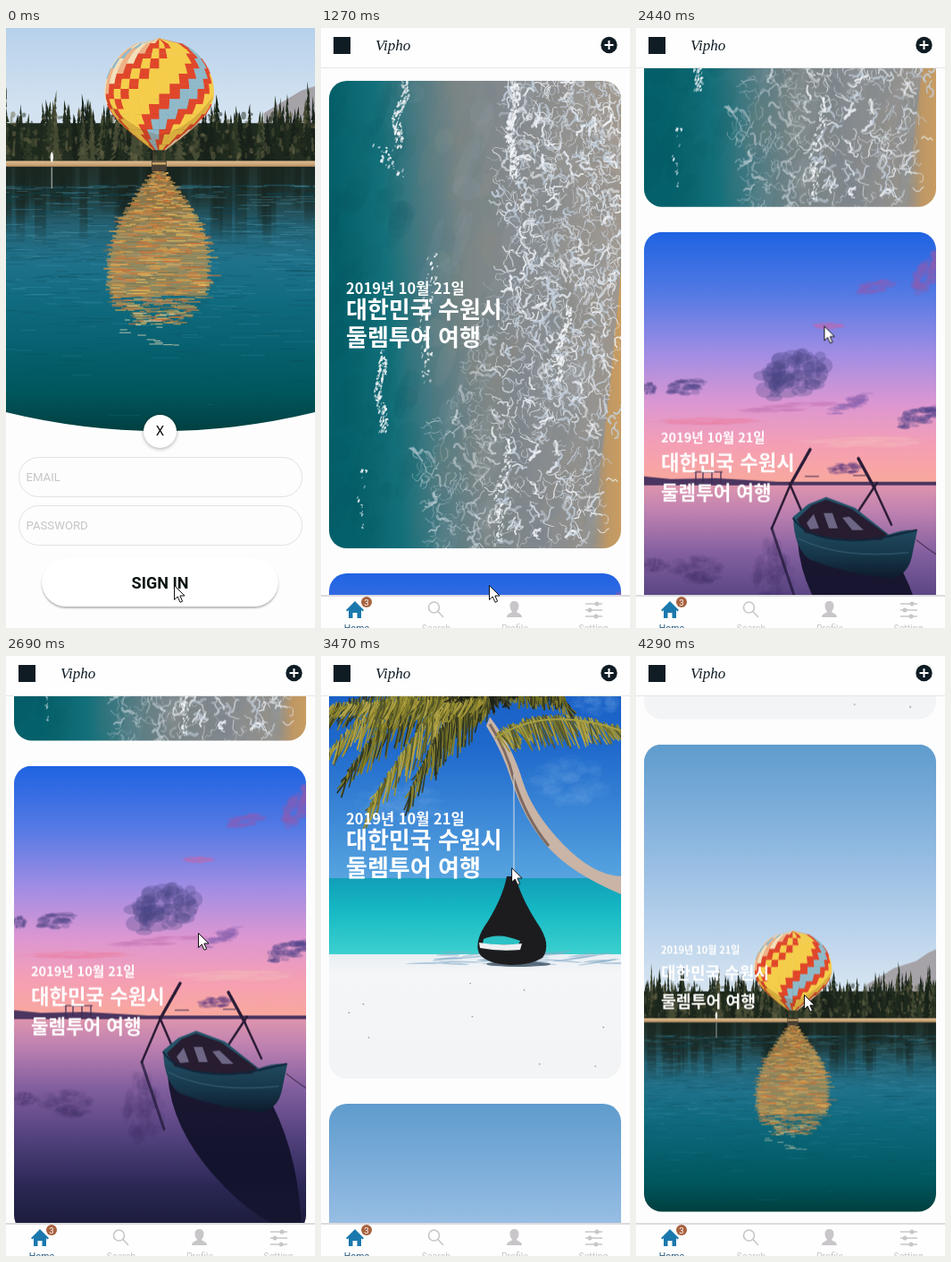
An HTML page with a canvas that plays this animation: 346 by 670 pixels, repeating every 4360 ms.

```html
<!DOCTYPE html>
<html lang="ko">
<head>
<meta charset="utf-8">
<title>Photo diary</title>
<style>
html, body { margin: 0; width: 100%; height: 100%; overflow: hidden; background: #fdfdfd; }
body { position: relative; font-family: Roboto, sans-serif; }
div, canvas, svg, span { position: absolute; box-sizing: border-box; }
.page { left: 0; top: 0; width: 346px; height: 670px; overflow: hidden; background: #fdfdfd; }

#lake { left: 0; top: 0; clip-path: path("M0 0H346V429Q173 471 0 429Z"); }
.close { left: 154px; top: 432px; width: 37px; height: 37px; border-radius: 50%; background: #fff;
  box-shadow: 0 1px 4px #0005; font: 15px/37px Roboto, sans-serif; text-align: center; color: #111; }
.field { left: 13.5px; width: 318px; height: 45px; border: 1px solid #e2e2e2; border-radius: 23px;
  padding-left: 8px; font-size: 13.2px; line-height: 44px; color: #c6c6c6; }
.sign { left: 40px; top: 592px; width: 265px; height: 54px; border-radius: 27px; background: #fff;
  box-shadow: 0 2px 2px #0004; font: bold 18px/55px Roboto, sans-serif; text-align: center; color: #0b1510; }

#home { opacity: 0; animation: enter 4.36s linear infinite; }
.track { left: 9px; top: 0; width: 327px; animation: scroll 4.36s linear infinite; }
.card { left: 0; width: 327px; height: 522px; border-radius: 20px; overflow: hidden; color: #fff; }
.card canvas { animation: develop 4.36s linear infinite; }
.card span { left: 19px; white-space: nowrap; line-height: 1; transform: translateY(-50%);
  font-family: "Noto Sans CJK KR", "Noto Sans CJK JP", sans-serif; font-weight: 700; }
.bar { left: 0; width: 346px; background: #fefefe; }
.head { top: 0; height: 45px; border-bottom: 1px solid #e6e6e6; }
.mark { left: 14px; top: 10px; width: 19px; height: 19px; background: #0f1c24; }
.title { left: 61px; top: 9px; font: italic 17px/22px "Liberation Serif", serif; color: #0f1c24; }
.nav { top: 633px; height: 37px; border-top: 2px solid #dcdcdf; overflow: hidden; }
.nav svg { left: 0; top: -2px; }

#pointer { left: 0; top: 0; width: 0; height: 0; animation: point 4.36s linear infinite; }
.press { left: -12px; top: -12px; width: 24px; height: 24px; border-radius: 50%; background: #cdb468e0;
  opacity: 0; animation: press 4.36s step-end infinite; }
#pointer svg { left: 0; top: 0; overflow: visible; }

@keyframes enter {
  0%, 21.779% { opacity: 0; transform: translateY(26px); }
  21.78%, 22.9% { opacity: .6; transform: translateY(26px); }
  24.541% { opacity: .84; transform: translateY(10px); }
  26.147% { opacity: .94; transform: translateY(4px); }
  29.128%, 100% { opacity: 1; transform: none; }
}
@keyframes develop {
  0%, 22.9% { opacity: .7; }
  27.5%, 100% { opacity: 1; }
}
@keyframes scroll {
  0%, 45.872% { transform: translateY(0); }
  48.6%, 49.7% { transform: translateY(-41px); }
  50.8% { transform: translateY(-125px); }
  52.982% { transform: translateY(-270px); }
  55.734% { transform: translateY(-375px); }
  58.716% { transform: translateY(-450px); }
  61.67%, 62.5% { transform: translateY(-486.5px); }
  65.596% { transform: translateY(-498px); }
  69.266% { transform: translateY(-505px); }
  71.101% { transform: translateY(-560px); }
  72.477% { transform: translateY(-640px); }
  74.06%, 75.5% { transform: translateY(-774px); }
  76.4% { transform: translateY(-980px); }
  78.67% { transform: translateY(-1155px); }
  81.422% { transform: translateY(-1310px); }
  83.716% { transform: translateY(-1400px); }
  85.3%, 86.9% { transform: translateY(-1441.5px); }
  89.908% { transform: translateY(-1482px); }
  91.743% { transform: translateY(-1500px); }
  93.578% { transform: translateY(-1550px); }
  95.413% { transform: translateY(-1590px); }
  98.37%, 100% { transform: translateY(-1609.5px); }
}
@keyframes point {
  0%, 39.679% { transform: translate(188px, 622px); }
  45.872% { transform: translate(192px, 570px); }
  48.6%, 49.7% { transform: translate(193px, 529px); }
  52.982% { transform: translate(208px, 345px); }
  61.67%, 62.5% { transform: translate(215px, 309px); }
  69.266% { transform: translate(222px, 395px); }
  74.06%, 77.064% { transform: translate(225px, 145px); }
  80.275% { transform: translate(210px, 260px); }
  85.3%, 86.9% { transform: translate(189px, 473px); }
  90.826% { transform: translate(188px, 482px); }
  95.413%, 100% { transform: translate(188px, 378px); }
}
@keyframes press {
  0%, 5.734%, 51.606%, 73.165%, 94.954%, 100% { opacity: 0; }
  2.982%, 45.872%, 69.266%, 90.826% { opacity: 1; }
}
</style>
</head>
<body>
<div class="page">
  <canvas id="lake" width="346" height="452"></canvas>
  <div class="close">X</div>
  <div class="field" style="top:478.5px">EMAIL</div>
  <div class="field" style="top:532.5px">PASSWORD</div>
  <div class="sign">SIGN IN</div>
</div>

<div class="page" id="home">
  <div class="track"></div>
  <div class="bar head">
    <div class="mark"></div>
    <div class="title">Vipho</div>
    <svg width="346" height="44"><circle cx="322.5" cy="19" r="9.2" fill="#0f1c24"/>
      <path d="M317.5 19h10M322.5 14v10" stroke="#fff" stroke-width="2"/></svg>
  </div>
  <div class="bar nav">
    <svg width="346" height="37" font-family="Roboto, sans-serif" font-size="10.5" text-anchor="middle">
      <path d="M28 17 38 7 48 17 46.500 18.500 45 17V26H40.500V20H35.500V26H31V17L29.500 18.500Z" fill="#1b78ad"/>
      <circle cx="51" cy="8" r="6" fill="#a8623f"/>
      <text x="51" y="11.500" font-size="9.500" fill="#fff">3</text>
      <g fill="none" stroke="#c9c6c9" stroke-width="1.600">
        <circle cx="126.500" cy="14" r="6"/><path d="M131 18.500 137 25"/>
        <path d="M296 10h19M296 17h19M296 24h19"/>
      </g>
      <g fill="#c9c6c9">
        <path d="M216.500 7c3 0 5 2 5 5 0 3-1 5-2.500 6.500 0 2 6 2 6 6.500H208c0-4.500 6-4.500 6-6.500-1.500-1.500-2.500-3.500-2.500-6.500 0-3 2-5 5-5Z"/>
        <circle cx="309" cy="10" r="2.500"/><circle cx="301" cy="17" r="2.500"/><circle cx="308" cy="24" r="2.500"/>
        <text x="129" y="41">Search</text><text x="217" y="41">Profile</text><text x="305" y="41">Setting</text>
      </g>
      <text x="40" y="41" fill="#2a5a80">Home</text>
    </svg>
  </div>
</div>

<div id="pointer">
  <div class="press"></div>
  <svg width="14" height="21"><path d="M.5.5V16.500L4.200 13 7 19.300 9.600 18.200 6.900 12H12Z" fill="#fff" stroke="#111"/></svg>
</div>

<script>
const W = 327, H = 522, TAU = Math.PI * 2;
const random = seed => () => (seed = seed * 16807 % 2147483647) / 2147483647;
const pick = (list, r) => list[Math.floor(r() * list.length)];

function fade(c, x0, y0, x1, y1, stops) {
  const g = c.createLinearGradient(x0, y0, x1, y1);
  stops.forEach(([at, color]) => g.addColorStop(at, color));
  return g;
}
function fall(c, top, bottom, stops) {
  c.fillStyle = fade(c, 0, top, 0, bottom, stops);
  c.fillRect(0, top, W, bottom - top);
}
function shape(c, color, path) {
  c.fillStyle = color;
  c.fill(new Path2D(path));
}
function line(c, color, width, path) {
  c.strokeStyle = color;
  c.lineWidth = width;
  c.stroke(new Path2D(path));
}
function oval(c, color, x, y, rx, ry, turn = 0) {
  c.fillStyle = color;
  c.beginPath();
  c.ellipse(x, y, rx, ry, turn, 0, TAU);
  c.fill();
}
function cloud(c, r, color, x, y, rx, ry, alpha = .3, tilt = 0) {
  c.globalAlpha = alpha;
  for (let i = 0; i < 60; i++) {
    const a = r() * TAU, d = Math.sqrt(r()) * .8, dx = Math.cos(a) * d * rx;
    oval(c, color, x + dx, y + Math.sin(a) * d * ry - dx * tilt, rx * (.08 + r() * .2), ry * (.1 + r() * .2));
  }
  c.globalAlpha = 1;
}

// Aerial view of surf on a beach
function surf(c) {
  const r = random(71);
  c.fillStyle = fade(c, 0, 20, W, 0, [[0, "#04606a"], [.16, "#13707a"], [.3, "#4d7a82"], [.44, "#7b8586"],
    [.62, "#848a8f"], [1, "#a39a90"]]);
  c.fillRect(0, 0, W, H);
  for (let i = 0; i < 260; i++) {
    c.globalAlpha = .07;
    const x = r() * W;
    oval(c, x < 90 ? "#004e5c" : pick(["#5d6f7a", "#9a8a74", "#a9b8c6"], r), x, r() * H, 4 + r() * 14, 8 + r() * 26, .3);
  }
  c.globalAlpha = 1;
  shape(c, fade(c, 295, 0, W, 0, [[0, "#b08f6800"], [.5, "#bd9765"], [1, "#c99d62"]]),
    "M327 210Q318 310 310 380T292 522H327Z");
  const sand = y => 332 - Math.max(0, y - 230) * .09 + 4 * Math.sin(y / 14);
  const edge = y => Math.max(105, 192 - Math.max(0, y - 220) * .45) + 9 * Math.sin(y / 24);
  c.lineCap = c.lineJoin = "round";
  // Foam threads wander along short random walks
  for (let i = 0; i < 1500; i++) {
    let y = r() * H, x = edge(y) + r() * (W - edge(y)), a = r() * TAU;
    if (x > sand(y)) continue;
    c.strokeStyle = pick(["#f0f3f7", "#dde4ec", "#c3d0de"], r);
    c.globalAlpha = (x > 185 ? 1 : .6) * (.4 + r() * .5);
    c.lineWidth = .6 + r() * r() * 3;
    c.beginPath();
    c.moveTo(x, y);
    for (let k = 0; k < 5; k++) {
      a += (r() - .5) * 2.6;
      c.lineTo(x += Math.cos(a) * 3, y += Math.sin(a) * 3.5);
    }
    c.stroke();
  }
  const crest = (x0, y0, x1, y1, n, wide) => {
    for (let i = 0; i < n; i++) {
      const t = r();
      c.globalAlpha = .4 + r() * .6;
      oval(c, "#f2f5f8", x0 + (x1 - x0) * t + (r() - .5) * wide + 3 * Math.sin(t * 9), y0 + (y1 - y0) * t,
        .4 + r() * 1.1, .6 + r() * 2, .4);
    }
  };
  crest(84, 0, 74, 78, 130, 9);
  crest(52, 70, 84, 110, 26, 12);
  crest(57, 300, 59, 392, 130, 9);
  crest(38, 430, 36, 500, 16, 8);
  crest(207, 0, 204, 108, 260, 9);
  crest(114, 190, 106, 340, 80, 12);
  crest(268, 250, 255, 336, 140, 6);
  crest(200, 400, 186, 520, 110, 9);
  c.globalAlpha = 1;
}

// Moored boat at dusk
function dusk(c) {
  const r = random(23);
  fall(c, 0, 282, [[0, "#1f63e2"], [.25, "#557ae4"], [.48, "#a08de4"], [.68, "#dc97d2"], [.85, "#f59fb4"], [1, "#f9a99c"]]);
  fall(c, 281, H, [[0, "#e096ae"], [.14, "#bc80b0"], [.32, "#8460a0"], [.55, "#54427f"], [.78, "#2b2855"], [1, "#181a36"]]);
  [["#4a4484", 166, 162, 46, 32, .3], ["#5a4c90", 47, 173, 26, 10, .1], ["#54478c", 306, 207, 27, 13, .3],
    ["#5a4c90", 6, 175, 10, 8, 0], ["#8b62ae", 230, 193, 28, 8, .5], ["#c06ab4", 207, 105, 20, 4, 0],
    ["#8460bc", 258, 62, 26, 8, .2], ["#8a5cb4", 320, 42, 22, 20, 1], ["#c97fb8", 160, 196, 60, 5, .1],
    ["#eb86aa", 70, 212, 70, 5, 0], ["#f3b3b8", 250, 235, 80, 7, 0], ["#634080", 226, 264, 22, 7, .1]
  ].forEach(([color, x, y, rx, ry, tilt]) => cloud(c, r, color, x, y, rx, ry, .3, tilt));
  [[60, 378, 34, 18], [145, 380, 26, 44], [12, 372, 18, 9]]
    .forEach(([x, y, rx, ry]) => cloud(c, r, "#34285f", x, y, rx, ry, .08));
  shape(c, "#4b3560", "M0 273 30 276 80 275 150 279 327 279V283H0Z");
  line(c, "#3a2a50", 1.2, "M55 268H88M58 268V280M66 262V280M76 268V280M86 268V280M180 273h16M234 272h14");
  shape(c, fade(c, 0, 360, 0, H, [[0, "#14122af0"], [.6, "#10112af0"], [1, "#10112690"]]),
    "M172 345Q176 405 226 460T322 522Q320 440 290 380Z");
  c.lineCap = "round";
  line(c, "#2b1c36", 3.500, "M186 243 164 282M240 253 258 286");
  line(c, "#2b1c36", 2.500, "M164 282 143 331M163 281 179 318M258 286 277 327M261 280 236 318");
  line(c, "#221a3ac0", 3, "M143 331 168 406");
  line(c, "#2b1c36", 1, "M305 344Q316 353 327 360");
  shape(c, fade(c, 0, 320, 0, 388, [[0, "#245369"], [.6, "#17374a"], [1, "#0d1a2c"]]),
    "M167 318Q168 354 186 366 230 383 278 387 296 382 300 362L306 333Q290 332 274 338L236 308 204 296 184 304Z");
  shape(c, "#271c30", "M171 321 188 305 204 299 232 309 272 338 266 344Q220 346 180 336Z");
  shape(c, "#6d6684", "M182 325 190 315 196 331 186 332ZM201 314 211 314 217 331 207 331ZM222 319 230 318 246 333 233 333Z");
  line(c, "#10263a", 2, "M167 320Q180 339 212 343T274 340L305 333");
  line(c, "#3b6478", 1, "M172 342Q220 366 296 358");
}

function frond(c, r, colors, x0, y0, mx, my, x1, y1, drop) {
  c.lineWidth = 1.6;
  for (let i = 0; i <= 130; i++) {
    const t = i / 130, s = 1 - t;
    const x = s * s * x0 + 2 * s * t * mx + t * t * x1;
    const y = s * s * y0 + 2 * s * t * my + t * t * y1;
    const len = drop * (.35 + .65 * Math.sin(Math.PI * Math.min(1, t * .85 + .1)));
    c.strokeStyle = pick(colors, r);
    c.beginPath();
    c.moveTo(x - 2, y - 7 * r());
    c.quadraticCurveTo(x, y, x + (x1 - x0) * .07 + (r() - .5) * 12, y + len * (.4 + r() * .8));
    c.stroke();
  }
}

// Leaning palm with a hanging chair
function palm(c) {
  const r = random(57);
  fall(c, 0, 300, [[0, "#1252bd"], [.5, "#1f69cc"], [1, "#58a5e0"]]);
  fall(c, 298, 386, [[0, "#129fb8"], [.4, "#16b9c4"], [1, "#3fd2d0"]]);
  fall(c, 383, H, [[0, "#e8eff4"], [.15, "#f5f6f8"], [1, "#f2f4f6"]]);
  [[232, 30, 40, 18], [45, 55, 50, 25], [270, 190, 50, 30], [80, 215, 60, 25], [300, 100, 30, 20]]
    .forEach(([x, y, rx, ry]) => cloud(c, r, "#80b8ec", x, y, rx, ry, .06));
  shape(c, "#c9b4a6", "M180 118Q205 150 217 190 228 225 262 260T327 296V316Q270 292 244 262 218 232 204 188 194 156 176 128Z");
  line(c, "#7f6a60", 3, "M180 126Q199 155 207 188 221 232 246 262");
  line(c, "#d9e2ec", 1, "M207 182V300");

  const dark = ["#22241a", "#33351f", "#1b2018", "#4a4a28"], olive = ["#6f6c24", "#8c842c", "#3c4022", "#2c3020"];
  const gold = ["#a09334", "#7c782a", "#55562a", "#b3a548"];
  for (let i = 0; i < 11; i++) frond(c, r, dark, 178, 95, 150 + i * 6, 10, 100 + i * 14, 18 + Math.abs(i - 5) * 8, 34);
  [[100, 70, -8, 116, 36], [90, 55, -4, 165, 38], [90, 65, 20, 190, 40], [120, 80, 46, 225, 42], [140, 90, 92, 205, 44], [100, 100, 4, 108, 24]]
    .forEach(([mx, my, x, y, drop], i) => frond(c, r, i % 2 ? gold : olive, 180, 100, mx, my, x, y, drop));
  [[225, 40, 268, 108, 30], [250, 62, 258, 90, 32], [215, 60, 232, 92, 30]]
    .forEach(([mx, my, x, y, drop]) => frond(c, r, olive, 185, 80, mx, my, x, y, drop));
  frond(c, r, gold, 190, 140, 240, 105, 330, 135, 28);
  line(c, "#a8a040", 2, "M186 142Q240 104 327 133");
  for (let i = 0; i < 40; i++) frond(c, r, dark, 178, 90, 178, 70, 125 + r() * 90, 20 + r() * 90, 6);

  for (let i = 0; i < 34; i++) {
    c.globalAlpha = .55;
    oval(c, "#84a9c6", 105 + r() * 225, 380 + r() * 14, 8 + r() * 20, 1, (r() - .5) * .4);
  }
  c.globalAlpha = 1;
  oval(c, "#586b7c", 212, 394, 36, 3);
  shape(c, "#1c1c1f", "M199 296H209Q214 318 233 348 250 372 239 387 226 395 204 395 176 394 168 382 162 368 178 346 195 318 199 296Z");
  shape(c, "#2cc2c6", "M173 366Q190 358 214 368L212 372H172Z");
  shape(c, "#eef0f2", "M168 370Q192 374 216 371L214 378Q190 380 169 376Z");
  for (let i = 0; i < 9; i++) oval(c, "#8f9296", r() * W, 415 + r() * 100, 1, .7);
}

// Hot-air balloon over a forest lake
const girth = y => y < 252 ? 43.5 * Math.sqrt(Math.max(0, 1 - ((252 - y) / 43.5) ** 2))
  : 5 + 38.5 * Math.cos((y - 252) / 45 * Math.PI / 2);

function envelope(c) {
  const Y = "#f5cd4a", R = "#e0472a", B = "#8fb9c8", C = "#f3dfb8", P = "#eeb184";
  // Diagonal bands, each given by where it ends
  const bands = [[6, C], [8, B], [13, C], [16, R], [18, Y], [20, R], [27, Y], [30, R], [34, B], [37, R], [43, Y], [46, R], [60, C]];
  const rows = 22, gores = 16, step = 88.5 / rows;
  for (let g = 0; g < gores; g++) {
    const a = Math.sin((g / gores - .5) * Math.PI), b = Math.sin(((g + 1) / gores - .5) * Math.PI);
    for (let k = 0; k < rows; k++) {
      const y = 208.5 + k * step, p = girth(y), q = girth(y + step);
      let color = bands.find(([end]) => k + 2 * g < end)[1];
      if (g < 6 && g % 2 && color === C) color = P;
      c.fillStyle = color;
      c.beginPath();
      c.moveTo(166.5 + a * p, y);
      c.lineTo(166.5 + b * p + .3, y);
      c.lineTo(166.5 + b * q + .3, y + step + .3);
      c.lineTo(166.5 + a * q, y + step + .3);
      c.fill();
    }
  }
  c.globalAlpha = .2;
  shape(c, "#6a3410", "M123 254Q136 285 161 297H172Q200 283 210 254 190 282 166 285 140 280 123 254Z");
  c.globalAlpha = 1;
}

function lake(c) {
  const r = random(91);
  fall(c, 0, 310, [[0, "#5f9ccd"], [.3, "#86b3de"], [.6, "#b0cdea"], [.85, "#d3e2f0"], [1, "#d8e4ee"]]);
  shape(c, "#a5a2a8", "M250 268 280 250 305 242 318 233 327 229V290H250Z");
  c.fillStyle = "#1f2a1e";
  c.fillRect(0, 276, W, 32);
  for (let i = 0; i < 170; i++) {
    const x = r() * (W + 20) - 10, tall = 38 + r() * r() * 30, wide = 4 + r() * 4;
    c.fillStyle = pick(["#18221a", "#222d1f", "#2d3826", "#454a33", "#1d281d"], r);
    for (let k = 0; k < 9; k++) {
      const top = 307 - tall + k * tall / 10, w = wide * (k + 1.5) / 9;
      c.beginPath();
      c.moveTo(x + (r() - .5) * 2, top);
      c.lineTo(x - w * (.6 + r() * .5), top + tall / 6);
      c.lineTo(x + w * (.6 + r() * .5), top + tall / 6);
      c.fill();
    }
  }
  for (let i = 0; i < 500; i++) {
    c.globalAlpha = .5;
    oval(c, pick(["#161f18", "#4d5238", "#6b6848", "#1f2a1e"], r), r() * W, 268 + r() * 38, .8 + r() * 1.2, 1 + r() * 3);
  }
  c.globalAlpha = 1;
  fall(c, 306, 311, [[0, "#e0bf92"], [1, "#b88f60"]]);
  fall(c, 310.5, H, [[0, "#22302a"], [.12, "#213f40"], [.22, "#256274"], [.35, "#20728b"], [.5, "#116b80"],
    [.68, "#06606f"], [.85, "#00565c"], [1, "#013f40"]]);
  for (let i = 0; i < 70; i++) {
    const end = 335 + r() * 42;
    c.fillStyle = fade(c, 0, 311, 0, end, [[0, "#18241ea0"], [.6, "#18241e70"], [1, "#18241e00"]]);
    c.fillRect(r() * W - 4, 311, 4 + r() * 8, end - 311);
  }
  for (let i = 0; i < 900; i++) {
    const y = 325 + r() * r() * 190, far = 1 - (y - 325) / 200;
    c.globalAlpha = .1 + .25 * far;
    c.fillStyle = pick(["#4f9db4", "#0a4f63", "#123c44"], r);
    c.fillRect(r() * W - 10, y, 5 + r() * 20, .8);
  }
  for (let y = 314; y < 436; y += 1.1) {
    const t = (y - 314) / 98, half = t < 1 ? girth(297 - t * 60) : 44 * Math.max(0, 1 - (t - 1) * 2.2);
    const wave = 166.5 + Math.sin(y * 1.7) * 2;
    if (t < 1) {
      c.globalAlpha = .7;
      c.fillStyle = "#c4954f";
      c.fillRect(wave - half * .92, y, half * 1.84, 1.2);
    }
    for (let i = 0; i < 6; i++) {
      c.globalAlpha = .65;
      c.fillStyle = pick(["#dca54a", "#e6bd62", "#c98442", "#b09a6c", "#d07038", "#7a7454"], r);
      const x = wave + (r() * 2 - 1) * half * .9, w = half * (.12 + r() * .3);
      c.fillRect(x - w / 2, y, w, 1.2);
    }
  }
  for (let i = 0; i < 16; i++) {
    c.globalAlpha = .65;
    c.fillStyle = "#d9d2b4";
    c.fillRect(132 + r() * 50, 424 + r() * 28, 3 + r() * 9, .9);
  }
  c.globalAlpha = 1;
  oval(c, "#f4f4f0", 81, 303, 1.2, 4);
  line(c, "#d8e0da90", 1.2, "M81 311V328");
  envelope(c);
  line(c, "#5c4a38", .8, "M162 297V307M171 297V307");
  shape(c, "#4a4034", "M160.5 306H172.500V314H160.500Z");
  shape(c, "#c9a468", "M161 307H172V309H161Z");
}

// Painter, text sizes and text centres of each card
const date = "2019년 10월 21일", place = "대한민국 수원시", tour = "둘렘투어 여행";
const cards = [
  [surf, [16.5, 26, 26], [231, 254, 285]],
  [dusk, [14.5, 22.300, 21.300], [229, 256, 290]],
  [palm, [16.5, 26, 26], [231, 254, 285]],
  [lake, [11, 18, 18.300], [229, 254, 286]]
];
const track = document.querySelector(".track");
cards.forEach(([paint, sizes, centres], i) => {
  const card = document.createElement("div");
  card.className = "card";
  card.style.top = 59 + i * 549.5 + "px";
  const photo = document.createElement("canvas");
  photo.width = W;
  photo.height = H;
  paint(photo.getContext("2d"));
  card.append(photo);
  [date, place, tour].forEach((text, k) => {
    const span = document.createElement("span");
    span.textContent = text;
    span.style.fontSize = sizes[k] + "px";
    span.style.top = centres[k] + "px";
    card.append(span);
  });
  track.append(card);
});

const cover = document.getElementById("lake").getContext("2d");
cover.setTransform(1.405, 0, 0, 1.405, -62.5, -281.5);
lake(cover);
</script>
</body>
</html>
```
